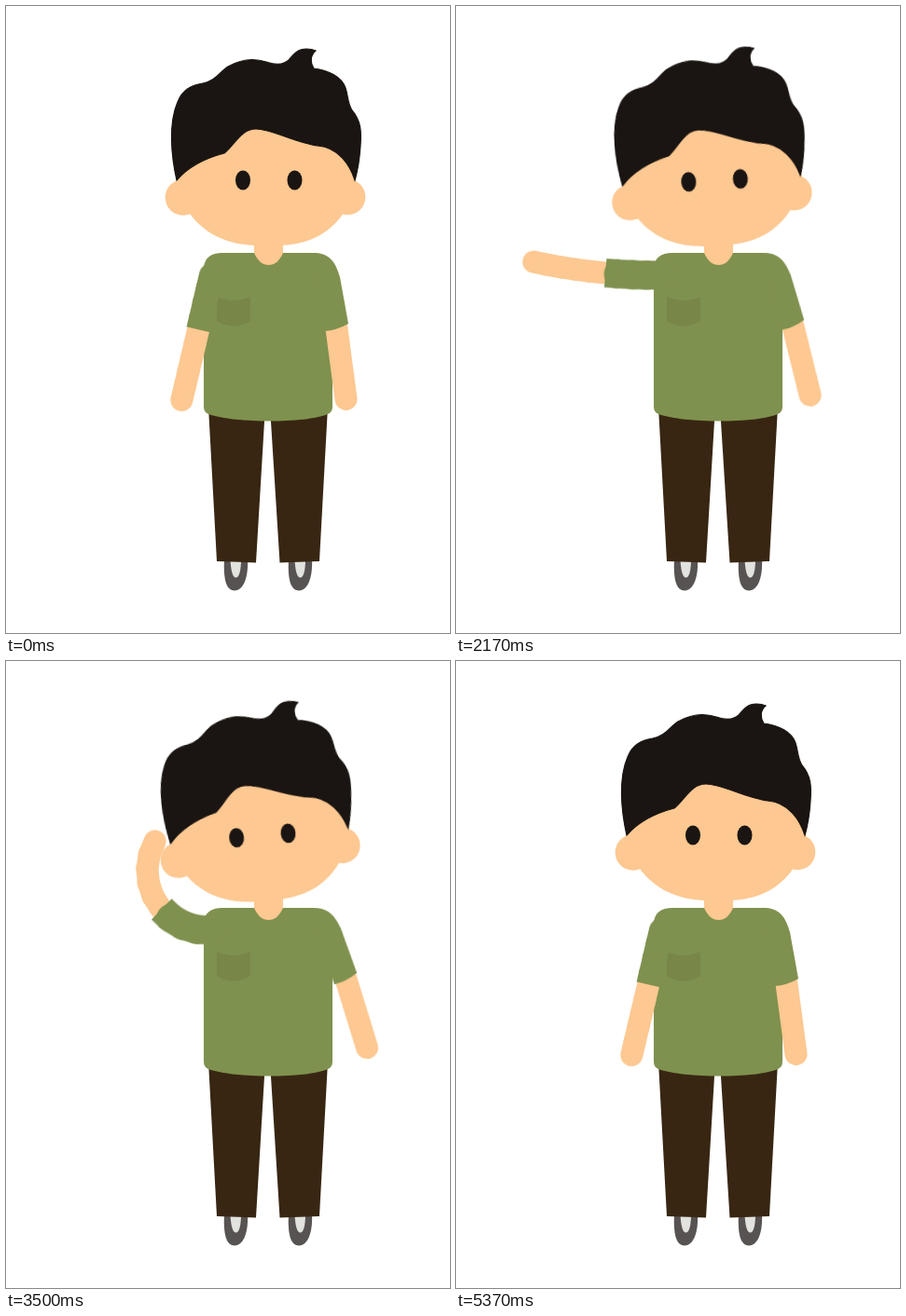
An HTML page without scripts for the animation above (5.41 s loop, 476 by 673 pixels).

```html
<!DOCTYPE html>
<html lang="en">
<head>
<meta charset="utf-8">
<title>Saluting boy</title>
<style>
  html, body { margin: 0; width: 100%; height: 100%; overflow: hidden; background: #fff; }
  svg { display: block; width: 100vw; height: 100vh; }

  .skin { fill: #fdc891; }
  .hair { fill: #1a1512; }
  .lock { stroke: #1a1512; stroke-width: 1.2; }
  .shirt { fill: #7f914e; }
  .limb, .cuff { fill: none; stroke: #fdc891; stroke-width: 24; stroke-linecap: round; }
  .cuff { stroke: #7f914e; stroke-width: 26; }
  .hem { stroke-linecap: butt; }

  .lean, .raise, .cuff, .joint, .eye {
    animation: 2705ms cubic-bezier(.455, .03, .515, .955) infinite;
  }
  .lean { animation-name: lean; }
  .head { --turn: -5deg; transform-origin: 282px 267px; }
  .side { --turn: -9.6deg; transform-origin: 334.5px 283px; }
  .raise { animation-name: raise; }
  .cuff { animation-name: widen; }
  .joint { animation-name: bend; }
  .eye { transform-box: fill-box; transform-origin: center; animation-name: squint; }

  @keyframes lean {
    0%, 3.14%, 97.08%, 100% { transform: rotate(0deg); }
    30.87%, 68.98% { transform: rotate(var(--turn)); }
  }
  @keyframes squint {
    0%, 3.14%, 30.87%, 100% { transform: scale(1); }
    17.7% { transform: scale(.7); }
  }
  /* the shoulder swings first, then every joint curls by the same angle */
  @keyframes raise {
    0%, 3.14%, 97.08%, 100% { transform: translate(220px, 289px) rotate(-76.7deg); }
    22.18%, 77.86% { transform: translate(220px, 289px) rotate(3deg); }
    3.14% { animation-timing-function: cubic-bezier(.5, 0, .75, .95); }
    77.86% { animation-timing-function: cubic-bezier(.25, .05, .5, 1); }
  }
  @keyframes bend {
    0%, 16.27%, 83.59%, 100% { transform: translateX(-15.3px) rotate(0deg); }
    30.87%, 68.98% { transform: translateX(-15.3px) rotate(14deg); }
  }
  @keyframes widen {
    0%, 3.14%, 97.08%, 100% { stroke-width: 26px; }
    17%, 83% { stroke-width: 31px; }
  }
</style>
</head>
<body>
<svg viewBox="0 0 476 673">
  <defs>
    <g id="shoe">
      <path fill="#575352" d="M234 594H259C260 612 255 627.5 245 627.5S233 612 234 594Z"/>
      <path fill="#e2e2de" d="M240.5 594H252C252 606 250 613.5 246.5 613.5S241 606 240.5 594Z"/>
    </g>
    <path id="bone" d="M0 0H-15.3"/>
  </defs>

  <use href="#shoe"/>
  <use href="#shoe" x="69"/>
  <path fill="#382613" d="M217 430H277V446L268 597.5L226 596ZM284 430H345L336 596L293.5 597.5L284 446Z"/>

  <g class="lean head">
    <circle class="skin" cx="190" cy="205.5" r="19.3"/>
    <circle class="skin" cx="366" cy="205" r="19.3"/>
    <path class="skin" d="M183 180C184 220 215 257 270 257H292C345 257 373 220 376 180L340 130H220Z"/>
    <path class="hair lock" d="M183 187C177 160 174 126 184 103C189 90 198 85 211 83C224 81 230 70 238 65C252 57 267 56 279 60C288 63 297 64 303 58C309 51 313 46 322 46Q328 46 332 48C326 53 326 61 330 67C346 69 360 76 364 88C367 97 366 104 371 112C381 124 381 135 380 150C379 165 377 177 374 187C369 171 357 152 334 150C312 147 284 132 268 132C252 132 246 148 234 158C215 163 196 172 183 187Z"/>
    <ellipse class="hair eye" cx="254" cy="187" rx="8" ry="10.5"/>
    <ellipse class="hair eye" cx="309.5" cy="187" rx="8" ry="10.5"/>
  </g>

  <path class="shirt" d="M212 283C212 270 220 265 232 265H330C343 265 350 274 350 285V430Q350 436 345 438C322 448 245 448 217 438Q212 436 212 430Z"/>
  <path fill="#788648" d="M226 312Q244 320 262 312V338Q244 349 226 338Z"/>
  <path class="skin" d="M266 250H297V265C293 274 288 278 281.5 278S270 274 266 265Z"/>

  <g class="lean side">
    <path class="limb" d="M351 320L364.5 422"/>
    <path class="shirt" d="M330 265C348 265 354 277 358 291L367 341Q355 348 341 349L335 300Z"/>
  </g>

  <!-- four sleeve bones, then five bare ones; outer bones lie underneath -->
  <g class="raise">
    <g class="joint">
      <g class="joint">
        <g class="joint">
          <g class="joint">
            <g class="joint">
              <g class="joint">
                <g class="joint">
                  <g class="joint"><use class="limb" href="#bone"/></g>
                  <use class="limb" href="#bone"/>
                </g>
                <use class="limb" href="#bone"/>
              </g>
              <use class="limb" href="#bone"/>
            </g>
            <use class="limb" href="#bone"/>
          </g>
          <path class="cuff hem" d="M0 0H-14"/>
        </g>
        <use class="cuff" href="#bone"/>
      </g>
      <use class="cuff" href="#bone"/>
    </g>
    <use class="cuff" href="#bone"/>
  </g>
</svg>
</body>
</html>
```
